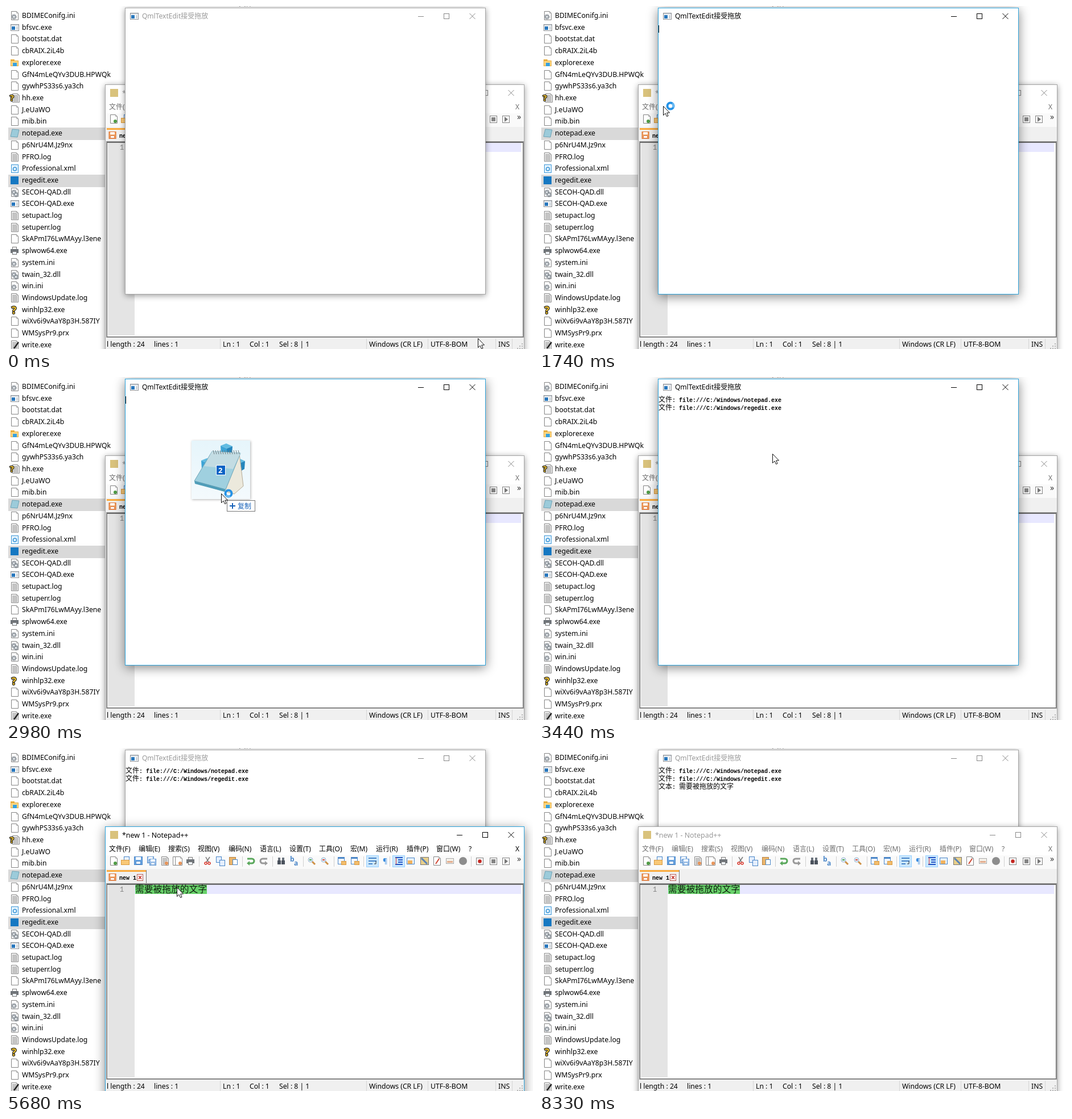
An HTML page with a canvas for the animation above (8400 ms loop, 926 by 604 pixels).

```html
<!DOCTYPE html>
<html lang="zh">
<head>
<meta charset="utf-8">
<title>QmlTextEdit</title>
<style>
html, body { margin: 0; width: 100%; height: 100%; overflow: hidden; background: #fff; }
canvas { display: block; }
</style>
</head>
<body>
<canvas id="stage" width="926" height="604"></canvas>
<script>
const c = document.getElementById('stage').getContext('2d');
const LOOP = 8400, ROW = 20.71;
const UI = '"Noto Sans", "Noto Sans CJK SC", sans-serif';
const MONO = '"Liberation Mono", "Noto Sans CJK SC", monospace';
const CJK = '"Noto Sans CJK SC", "Noto Sans CJK", sans-serif';

// Icon kind and name of each listed file
const files = `i BDIMEConifg.ini,a bfsvc.exe,p bootstat.dat,p cbRAIX.2iL4b,f explorer.exe,
p GfN4mLeQYv3DUB.HPWQk,p gywhPS33s6.ya3ch,h hh.exe,p J.eUaWO,p mib.bin,n notepad.exe,p p6NrU4M.Jz9nx,
l PFRO.log,x Professional.xml,r regedit.exe,d SECOH-QAD.dll,a SECOH-QAD.exe,l setupact.log,l setuperr.log,
p SkAPmI76LwMAyy.l3ene,s splwow64.exe,i system.ini,d twain_32.dll,i win.ini,l WindowsUpdate.log,
q winhlp32.exe,p wiXv6i9vAaY8p3H.587IY,p WMSysPr9.prx,w write.exe`.split(',').map(s => s.trim());

// Cursor moves: start, end, steps, x, y, optional bend
const moves = [
  [70, 130, 2, 567, 251],
  [280, 980, 10, 126, 217, 90, 0],
  [1130, 1500, 6, 330, 90],
  [1600, 1970, 6, 180, 205],
  [2050, 2200, 3, 125, 208],
  [2280, 2430, 3, 128, 222],
  [2750, 2980, 4, 378, 205],
  [3060, 3290, 4, 410, 135],
  [3990, 4150, 3, 336, 502, 420, -80],
  [4300, 4450, 3, 342, 531],
  [4530, 5140, 9, 520, 570, 520, 480],
  [5220, 5680, 7, 300, 245, -150, 150],
  [6000, 6460, 7, 505, 103],
  [7550, 7930, 6, 845, 612]
];

function cursorAt(t) {
  let x = 829, y = 585;
  for (const [t0, t1, n, ex, ey, bx = (x + ex) / 2, by = (y + ey) / 2] of moves) {
    if (t < t0) break;
    const p = Math.min(n, 1 + Math.floor((t - t0) / (t1 - t0) * (n - 1) + 0.1)) / n;
    const e = 1 - (1 - p) ** 2, a = (1 - e) ** 2, b = 2 * e * (1 - e);
    x = a * x + b * bx + e * e * ex;
    y = a * y + b * by + e * e * ey;
  }
  return [Math.round(x), Math.round(y)];
}

function box(x, y, w, h, fill, stroke) {
  if (fill) { c.fillStyle = fill; c.fillRect(x, y, w, h); }
  if (stroke) { c.strokeStyle = stroke; c.lineWidth = 1; c.strokeRect(x + 0.5, y + 0.5, w - 1, h - 1); }
}
function poly(pts, fill, stroke, width = 1) {
  c.beginPath();
  for (let i = 0; i < pts.length; i += 2) c.lineTo(pts[i], pts[i + 1]);
  if (fill) { c.closePath(); c.fillStyle = fill; c.fill(); }
  if (stroke) { c.strokeStyle = stroke; c.lineWidth = width; c.stroke(); }
}
function disc(x, y, r, fill, stroke, width = 1, from = 0, to = 7) {
  c.beginPath();
  c.arc(x, y, r, from, to);
  if (fill) { c.fillStyle = fill; c.fill(); }
  if (stroke) { c.strokeStyle = stroke; c.lineWidth = width; c.stroke(); }
}
function text(s, x, y, color = '#000', size = 12, font = UI, weight = 400) {
  c.font = `${weight} ${size}px ${font}`;
  c.fillStyle = color;
  c.fillText(s, x, y);
}
function at(x, y, draw) {
  c.save();
  c.translate(x, y);
  draw();
  c.restore();
}

function page(lines, dot) {
  poly([-5.5, -7.5, 3.5, -7.5, 6.5, -4.5, 6.5, 7.5, -5.5, 7.5, -5.5, -7.5], '#fff', '#858585');
  poly([3.5, -7, 3.5, -4.5, 6, -4.5], null, '#aaa');
  if (lines) for (let y = -5; y < 7; y += 2) box(-4, y, y < -3 ? 7 : 9, 1, '#8a8a8a');
  if (dot) disc(3, 4, 3, dot);
}
function gear(x, y) {
  c.setLineDash([1.6, 1]);
  disc(x, y, 4, null, '#8c939a', 1.6);
  c.setLineDash([]);
  disc(x, y, 2.5, '#eef1f4', '#8c939a', 1.4);
}
function folder() {
  box(-7, -6, 7, 4, '#e9ad3d');
  box(-7, -4, 14, 10, '#ffd780', '#e6ad45');
}
function printer() {
  box(-4, -7, 8, 5, '#fff', '#777');
  box(-7, -3, 14, 7, '#70757a');
  box(-4, 1, 8, 6, '#eef3f8', '#777');
}
function disk(fill, line) {
  box(-8, -8, 15, 15, fill, line);
  box(-5, -7, 9, 5, '#fff');
  box(-5, 0, 9, 6, '#fff', line);
}
function appWindow() {
  box(-7, -6, 15, 12, '#fff', '#8b8f94');
  box(-6, -5, 13, 2, '#d5dbe1');
  box(-5, -2, 6, 6, '#2777bd');
  box(3, -2, 3, 6, '#cfd5da');
}
function question(x, y, size) {
  c.font = `700 ${size}px ${UI}`;
  c.lineWidth = 2.5;
  c.strokeStyle = '#2d2a20';
  c.strokeText('?', x, y);
  text('?', x, y, '#f4c52e', size, UI, 700);
}
const icons = {
  p: () => page(),
  l: () => page(true),
  i() { page(); gear(-1, 2); },
  d() { page(); gear(-1, 0); gear(2.5, 4); },
  x() { box(-6, -7, 13, 15, '#e5f4ff', '#3c96d6'); disc(0.5, 1, 3, null, '#3c96d6', 1.5); },
  a: appWindow,
  f() { folder(); box(-3, 0, 7, 6, '#38a1de'); },
  h() { at(2, 0, () => page(true)); question(-8, 5, 14); },
  n() { poly([-4, -7, 8, -6, 5, 7, -7, 6], '#9ccbda', '#6fa3b5'); },
  r() { box(-7, -7, 14, 14, '#1678c2'); },
  s: printer,
  q() { question(-5, 7, 17); },
  w() { page(true); poly([-1, 6, 7, -5], null, '#222', 2.5); }
};

function explorer(t, mx, my) {
  box(0, 0, 926, 604, '#fff');
  text('bcastdvr.exe', 28, 0);
  text('2017-9-24 13:29', 251, 0, '#6d6d6d');
  text('XML 文件', 382, 0, '#6d6d6d');
  text('2024 KB', 525, 0, '#6d6d6d');
  const dragging = t >= 2750 && t < 3290;
  const hover = mx < 174 && !dragging ? Math.floor((my - 6.6) / ROW) : -1;
  files.forEach((file, i) => {
    const y = Math.round(17 + i * ROW), selected = i === 10 || i === 14, top = y - 10;
    if (selected) box(4, top, 600, 22, i === hover ? '#cce8ff' : '#d9d9d9', i === hover ? '#99d1ff' : null);
    else if (i === hover) box(4, top, 600, 21, '#e5f3ff');
    at(15, y, icons[file[0]]);
    text(file.slice(2), 28, y + 4, '#000', 12.2);
  });
}

function frame(x, y, w, h, active) {
  c.save();
  c.shadowColor = active ? 'rgba(0,0,0,.48)' : 'rgba(0,0,0,.4)';
  c.shadowBlur = active ? 18 : 10;
  c.shadowOffsetY = active ? 4 : 2;
  box(x, y, w, h, '#fff');
  c.restore();
  box(x, y, w, h, null, active ? '#2ba3dc' : '#a5a5a5');
  const ink = active ? '#000' : '#888', r = x + w, m = y + 15;
  box(r - 119, m, 10, 1, ink);
  box(r - 74, m - 5, 10, 10, null, ink);
  poly([r - 28.5, m - 5, r - 18.5, m + 5], null, ink);
  poly([r - 18.5, m - 5, r - 28.5, m + 5], null, ink);
}

function dropTarget(t, active) {
  frame(209, 3, 634, 505, active);
  at(225, 18, appWindow);
  text('QmlTextEdit接受拖放', 239, 22, active ? '#000' : '#999');
  const row = (label, body, y, font, size, weight) => {
    text(label, 210, y, '#000', 12, CJK);
    text(':', 234, y, '#000', 10, MONO, 700);
    text(body, 246, y, '#000', size, font, weight);
  };
  if (t >= 3440) {
    row('文件', 'file:///C:/Windows/notepad.exe', 44, MONO, 10, 700);
    row('文件', 'file:///C:/Windows/regedit.exe', 58, MONO, 10, 700);
  } else if (active && t < 3350 && (t < 2350 || t >= 2850)) box(210, 34, 1, 13, '#000');
  if (t >= 6690) row('文本', '需要被拖放的文字', 72, CJK, 12);
}

function toolbar() {
  const blue = '#4a86c8', put = (x, draw) => at(x, 199, draw);
  for (const x of [339, 415, 468, 522, 576, 628, 674, 817]) box(x, 191, 1, 18, '#d0d0d0');
  for (const x of [633, 679]) box(x, 189, 22, 21, '#cce8ff', '#99d1ff');
  put(189, () => page(false, '#4f9b45'));
  put(210, () => { box(-3, -8, 10, 10, '#eaf3ff', blue); box(-8, -2, 15, 9, '#f9c877', '#d99a41'); });
  put(233, () => disk('#6aa5e2', blue));
  put(256, () => { c.scale(0.8, 0.8); at(-2, -2, () => disk('#a9c9ee', blue)); at(3, 3, () => disk('#a9c9ee', blue)); });
  put(279, () => page(true, '#e8955a'));
  put(299, () => page());
  put(303, () => page(false, '#e8955a'));
  put(324, printer);
  put(354, () => {
    poly([-3, -7, 2, 2], null, '#777', 1.5);
    poly([4, -7, -2, 2], null, '#777', 1.5);
    disc(-3, 4, 2, null, '#d8362a', 1.5);
    disc(3, 4, 2, null, '#d8362a', 1.5);
  });
  for (const d of [-3, 3]) put(377 + d, () => box(-5, d - 5, 10, 11, '#e5efff', blue));
  put(400, () => { box(-8, -7, 12, 14, '#eab56c', '#b98340'); box(-2, -3, 9, 10, '#fff', blue); });
  const arrow = (x, dir, color) => put(x, () => {
    c.scale(dir, 1);
    poly([-6, -4, 2, -4], null, color, 3);
    disc(2, 0, 4, null, color, 3, -1.57, 1.57);
    poly([2, 4, -2, 4], null, color, 3);
    poly([-7, 4, -2, 0, -2, 8], color);
  });
  arrow(430, 1, '#5aa85c');
  arrow(453, -1, '#999');
  put(483, () => { for (const x of [-6, 1]) { box(x, -1, 6, 7, '#4b535d'); box(x + 1, -6, 4, 5, '#6a727c'); } });
  put(506, () => { text('b', -7, 1, blue, 12, UI, 700); text('a', 0, 8, blue, 12, UI, 700); });
  [[537, '#4aa64d'], [560, '#dd4b3b']].forEach(([x, color]) => put(x, () => {
    poly([1, 1, 6, 6], null, '#cf9146', 3);
    disc(-2, -2, 4, '#dfeefb', '#9bb4cc');
    box(-4, -3, 4, 2, color);
  }));
  for (const x of [590, 613]) put(x, () => {
    box(-7, -7, 12, 13, '#f2f7ff', blue);
    box(-7, -7, 12, 3, blue);
    box(-1, 0, 9, 7, '#f2bd6c', '#d99a41');
  });
  put(644, () => { for (const y of [-6, -1, 4]) box(-7, y, y < 0 ? 14 : 7, 2, blue); poly([6, 0, 6, 5, 3, 5], null, '#333'); });
  text('¶', 662, 204, '#3f8fe0', 13);
  put(690, () => {
    for (const y of [-7, 5]) box(-6, y, 13, 2, '#2356c5');
    for (const y of [-3, 1]) box(-1, y, 8, 2, '#2356c5');
    box(-5, -6, 1, 12, '#d33');
  });
  put(711, () => { box(-7, -6, 14, 12, '#e8f2ff', blue); box(-5, -1, 8, 6, '#f2b25c'); });
  put(735, () => { box(-7, -7, 15, 14, '#e8cf8a', '#777'); poly([-5, -5, 5, 5], null, '#5a83b8', 3); });
  put(757, () => { page(); poly([-2, 5, 4, -4], null, '#cf4733', 2); });
  put(780, () => { box(-7, -5, 14, 10, '#f3f0ea', '#aaa'); box(-5, 0, 10, 3, '#e5ae8f'); });
  disc(803, 199, 7, '#8d8d8d');
  for (const x of [832, 856, 878]) box(x - 6, 193, 13, 13, '#f8f8f8', '#858585');
  disc(832.5, 199.5, 3.2, '#c42620');
  box(853, 196, 7, 7, '#858585');
  poly([876, 195, 882, 199.5, 876, 204], '#777');
  text('»', 898, 200, '#333', 14);
}

const menu = [['文件(F)', 181], ['编辑(E)', 233], ['搜索(S)', 285], ['视图(V)', 337], ['编码(N)', 391],
  ['语言(L)', 446], ['设置(T)', 498], ['工具(O)', 550], ['宏(M)', 605], ['运行(R)', 650], ['插件(P)', 704],
  ['窗口(W)', 756], ['?', 813], ['X', 895]];
const status = [['l length : 24', 177], ['lines : 1', 260], ['Ln : 1', 381], ['Col : 1', 428], ['Sel : 8 | 1', 480],
  ['Windows (CR LF)', 638], ['UTF-8-BOM', 746], ['INS', 865]];

function editor(t, active) {
  frame(174, 138, 737, 480, active);
  box(183, 146, 14, 14, '#d9c27c');
  text('*new 1 - Notepad++', 204, 158, active ? '#000' : '#999', 12.4);
  for (const [label, x] of menu) text(label, x, 182, active ? '#000' : '#6d6d6d');
  box(175, 189, 735, 24, '#fafafa');
  toolbar();
  box(175, 213, 735, 391, '#f0f0f0');
  box(177, 215, 70, 3, '#faaa3c');
  box(246, 215, 1, 23, '#777');
  at(187.5, 228, () => { c.scale(0.85, 0.85); disk('#f0a060', '#d86a2a'); });
  text('new 1', 199, 232, '#000', 10, MONO, 700);
  box(230, 222, 11, 12, '#fff', '#b65a52');
  poly([233, 225, 238, 231], null, '#c4322a', 1.5);
  poly([238, 225, 233, 231], null, '#c4322a', 1.5);
  box(176, 238, 734, 346, null, '#a0a0a0');
  box(177, 239, 732, 344, '#fff', '#696969');
  box(178, 240, 730, 1, '#696969');
  box(179, 241, 47, 339, '#e4e4e4');
  box(226, 241, 679, 16, '#e8e8ff');
  text('1', 200, 253, '#808080', 12, MONO);
  box(227, 241, 126, 16, '#69d26b');
  text('需要被拖放的文字', 227, 253.5, '#102010', 15.75, CJK);
  if (t >= 6770 && t < 7320) box(227, 241, 1, 16, '#8000ff');
  for (const x of [376, 633, 741, 860, 889]) box(x, 586, 1, 18, '#d5d5d5');
  for (const [label, x] of status) text(label, x, 600, '#000', 12.2);
  for (let i = 0; i < 3; i++) for (let j = 0; j <= i; j++) box(906 - j * 4, 594 + i * 4, 2, 2, '#b5b5b5');
}

function dragImage(overTarget) {
  c.save();
  c.shadowColor = 'rgba(0,0,0,.3)';
  c.shadowBlur = 4;
  c.shadowOffsetX = c.shadowOffsetY = 1;
  const shade = c.createLinearGradient(0, -93, 0, 11);
  shade.addColorStop(0, '#e6f5fb');
  shade.addColorStop(1, '#f4fafd');
  box(-52, -93, 103, 103, shade);
  c.restore();
  for (const [x, y] of [[9, -79], [-25, -53], [31, -53]]) {
    poly([x - 10, y - 5, x, y - 9, x + 11, y - 4, x + 1, y], '#62bce2');
    poly([x - 10, y - 5, x + 1, y, x + 1, y + 15, x - 9, y + 10], '#3ca4d6');
    poly([x + 1, y, x + 11, y - 4, x + 10, y + 10, x + 1, y + 15], '#2486bd');
  }
  poly([32, -70, 39, -13, 23, 1, -16, -10], '#ece9dc', '#b5aa96');
  poly([-16, -74, 34, -71, 8, -7, -47, -22], '#9fd0df', '#6fa5b7');
  poly([-16, -74, 34, -71, 21, -43, -30, -48], '#c3dce3');
  poly([-47, -22, 8, -7, 6, -3, -46, -17], '#4f9db8');
  for (let x = -14; x < 34; x += 4) poly([x, -76, x + 2, -69], null, '#6e7d83');
  box(-9, -50, 17, 18, '#0b63c5', '#fff');
  text('2', -5, -36, '#fff', 13, UI, 700);
  if (overTarget) {
    box(10, 12, 50, 20, '#fff', '#777');
    box(15, 21, 10, 2, '#1660b8');
    box(19, 17, 2, 10, '#1660b8');
    text('复制', 29, 26.5, '#1660b8', 12, CJK);
  }
}

function pointer(t) {
  poly([0.5, 0.5, 0.5, 16.5, 4, 13, 6.5, 18.5, 9, 17.5, 6.7, 12, 11.5, 12, 0.5, 0.5], '#fff', '#111');
  if (t >= 1580 && t < 3440) {
    disc(13, 0, 5.5, null, '#2492e6', 4);
    disc(13, 0, 5.5, null, '#69b9f3', 4, t / 150, t / 150 + 1.5);
  }
  if (t >= 6000 && t < 6690) {
    c.setLineDash([1, 1]);
    box(8, 14, 10, 7, null, '#333');
    c.setLineDash([]);
  }
}

function draw(now) {
  const t = now % LOOP, [mx, my] = cursorAt(t), raised = t >= 4370;
  const back = () => editor(t, raised && t < 8330);
  const front = () => dropTarget(t, t >= 1580 && !raised);
  explorer(t, mx, my);
  (raised ? [front, back] : [back, front]).forEach(paint => paint());
  at(mx, my, () => {
    if (t >= 2750 && t < 3290) dragImage(mx > 209);
    pointer(t);
  });
  requestAnimationFrame(() => draw(performance.now() - start));
}
const start = performance.now();
draw(0);
</script>
</body>
</html>
```
